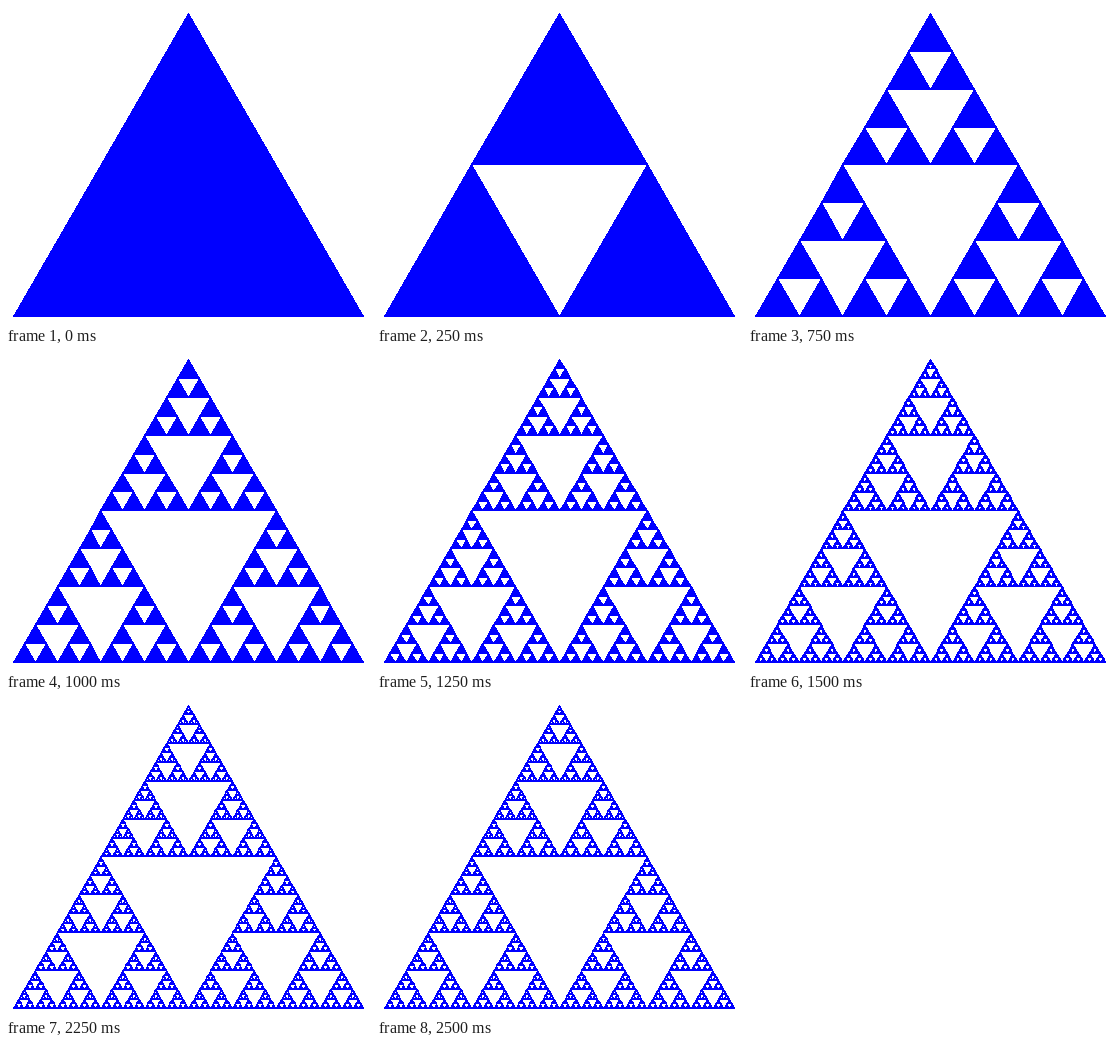
Animation, 365 px wide and 318 px high, one loop 2750 ms. Source, as an HTML page with a canvas:

```html
<!DOCTYPE html>
<html lang="en">
<head>
<meta charset="utf-8">
<title>Triangle fractal</title>
<style>
  html, body { margin: 0; width: 100%; height: 100%; overflow: hidden; background: #fff; }
  canvas { display: block; width: 365px; height: 318px; image-rendering: pixelated; }
</style>
</head>
<body>
<canvas id="stage" width="365" height="318"></canvas>
<script>
  const LOOP = 2750, STEP = 250, MAX_DEPTH = 7;
  const LEFT = 6.85, TOP = 6.85, SIDE = 350.5, HEIGHT = 303.2;
  const SLACK = 0.38; // how far an edge may enter a pixel before it is filled

  const ctx = document.getElementById('stage').getContext('2d');

  // Solid triangle with hard pixel edges, filled row by row
  function fillTriangle(x, y, side, height) {
    const apex = Math.round(x + side / 2);
    const left = Math.round(x), right = Math.round(x + side);
    const top = Math.round(y), rows = Math.round(y + height) - top;
    for (let i = 0; i <= rows; i++) {
      const k = rows ? i / rows : 1;
      const from = Math.floor(apex + (left - apex) * k + SLACK);
      const to = Math.ceil(apex + (right - apex) * k - SLACK);
      ctx.fillRect(from, top + i, to - from + 1, 1);
    }
  }

  function divide(x, y, side, height, depth) {
    if (depth === 0) {
      fillTriangle(x, y, side, height);
      return;
    }
    const s = side / 2, h = height / 2;
    divide(x + s / 2, y, s, h, depth - 1);
    divide(x, y + h, s, h, depth - 1);
    divide(x + s, y + h, s, h, depth - 1);
  }

  function draw(depth) {
    ctx.fillStyle = '#fff';
    ctx.fillRect(0, 0, 365, 318);
    ctx.fillStyle = '#00f';
    divide(LEFT, TOP, SIDE, HEIGHT, depth);
  }

  const start = performance.now();
  let shown = 0;
  draw(shown);

  function tick() {
    const time = (performance.now() - start) % LOOP;
    const depth = Math.min(MAX_DEPTH, Math.floor(time / STEP));
    if (depth !== shown) draw(shown = depth);
    requestAnimationFrame(tick);
  }
  requestAnimationFrame(tick);
</script>
</body>
</html>
```
